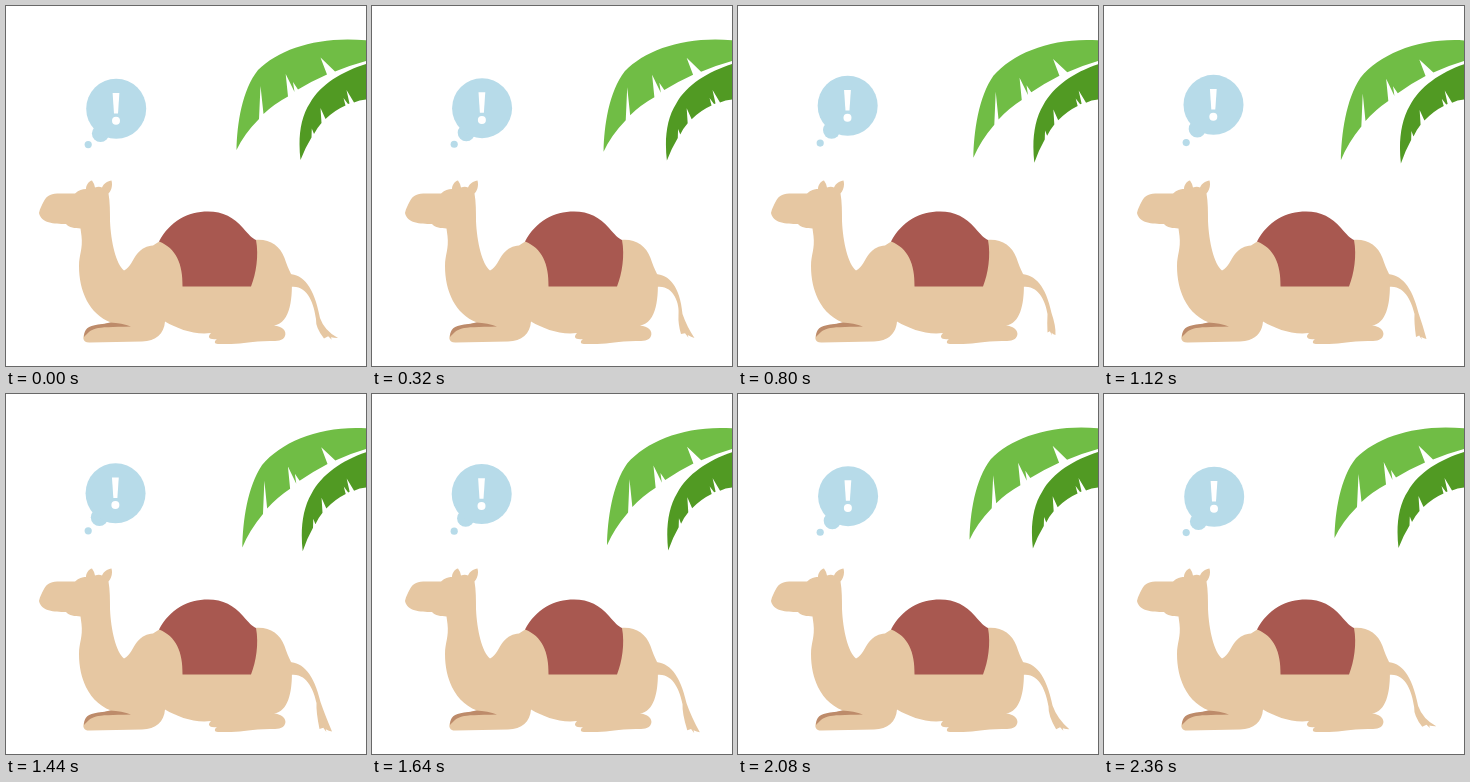
These frames come from a looping animation (360x360 px, 2400 ms). An HTML page:

```html
<!DOCTYPE html>
<html>
<head>
<meta charset="utf-8">
<style>
html, body { margin: 0; width: 100%; height: 100%; overflow: hidden; background: #fff; }
svg { display: block; width: 100vw; height: 100vh; }
</style>
</head>
<body>
<svg viewBox="0 0 360 360">
  <path id="lightLeaf" fill="#70bd45"/>
  <path id="darkLeaf" fill="#519a23"/>
  <g fill="#b7dbe9">
    <circle id="dot" cx="82.2" cy="138.6" r="3.6"/>
    <circle id="puff" cx="94.5" cy="127.5" r="8.6"/>
    <g id="bubble">
      <circle cx="110.2" cy="102.8" r="30"/>
      <path fill="#fff" d="M106.600,87H113.400L112,107.500H108Z"/>
      <circle fill="#fff" cx="110" cy="114.7" r="4"/>
    </g>
  </g>
  <g fill="#e6c7a2">
    <path id="tail"/>
    <path d="M33,207C34,202 36,199 38,195C41,189 46,187.5 54,187.5H69C73,184 76,183 80,183C80,179 83,175 86,174.5
      Q88,177 89,181.5Q93,180 96,181.5C98,177 102,175 105.5,174.5C107,180 105,185 102.5,187.5
      C104,196 104,206 104,215C105,236 110,258 118,264.5C124,262 127,253 131,248C136,242 141,240 147,239.5L154,235
      L200,215L249,234C263,232.5 274,239.5 278.5,252C280.5,258 283,264 285.5,269C287,290 285,317 268,319.5
      C276,320 281,325 279,330C277,335 271,335 264,335C245,335 238,338 225,338H212
      C208,338 208,335 211,333C203,334 201,331 205,327C188,329 172,323 159,315.5
      C158,328 150,335 136,335.5L84,336.5C76,337 76,330 80,325.5C86,319 96,319 105,316.5
      C83,308 73,285 73,260C73,249 77,243 75.5,230L74.5,222.5C69,222 63,222 60,218C48,218 35,217 33,207Z"/>
  </g>
  <path fill="#bd8b6a" d="M78,331C78,323 82,320 92,318.5Q99,318 104,316.5Q116,317 125,320.5
    C106,321 95,321 90,322.5C84,324 82,327 78,331Z"/>
  <path fill="#a85850" d="M153,235.5C164,215 182,205.5 202,205.5C217,205.5 228,211.500 237,222C243,229 246,232 250,234
    C253,250 250,268 245,280.5H176.5C177,258 170,242 153,235.5Z"/>
</svg>
<script>
const LOOP = 2400;
const el = id => document.getElementById(id);

const lightLeaf = `M230.5,144C231,118 236,84 252,64C274,42 315,29.5 362,34.5L362,54.5Q345,59 329,65.5L314.5,51.5L321,68.5
  Q306,75 292,83.5L287,76L288.5,86L279.7,68L282,90.5Q268,98 257.5,108L254.5,80L253,113Q238,128 230.5,144Z`;
const darkLeaf = `M294.5,154C292,133 294,112 304,97C315,78 337,65 362,57.5L362,93.5Q354,93.5 348,96.5L340.5,84
  L343.5,97.5L342,98L337.5,92L339.5,99.5Q329,104 319.5,113L314.5,102L315.5,117Q311,122 308,128L305.8,122.5L305.5,131.5Q299,142 294.5,154Z`;

// Bends a leaf downwards, more so the farther a point is from its stem
function bend(path, amount, dx) {
  return path.replace(/([\d.]+),([\d.]+)/g, (_, x, y) => {
    const d = Math.max(0, 360 - x) / 130;
    return `${+x + amount * dx * d ** 2},${+y + amount * 10.5 * d ** 1.6}`;
  });
}

// Tail poses: time, then x and y of the neck, right tip and left tip of the tuft
const poses = [
  [0, 312.5, 313, 332, 332, 318, 332.5],
  [320, 309, 309, 322.5, 332, 309, 328],
  [800, 312, 308, 317.5, 329, 309.5, 326.5],
  [1120, 313, 308, 322.5, 333, 312, 331],
  [1440, 313, 309, 326, 337.5, 313.5, 335],
  [1800, 313, 311, 329, 338, 316.5, 336.5]
];

function poseAt(i) {
  const n = poses.length, [time, ...values] = poses[(i + n) % n];
  return { time: time + Math.floor(i / n) * LOOP, values };
}

// Smooth cyclic interpolation between the poses
function tailValues(t) {
  const i = poses.findLastIndex(p => p[0] <= t);
  const [a, b, c, d] = [i - 1, i, i + 1, i + 2].map(poseAt);
  const span = c.time - b.time, u = (t - b.time) / span;
  return b.values.map((p, k) => {
    const q = c.values[k];
    const m = (q - a.values[k]) / (c.time - a.time) * span;
    const n = (d.values[k] - p) / (d.time - b.time) * span;
    return p + u * (m + u * (3 * (q - p) - 2 * m - n + u * (2 * (p - q) + m + n)));
  });
}

function tailPath(t) {
  const [nx, ny, rx, ry, lx, ly] = tailValues(t);
  const tuft = (f, dy) => `${lx + (rx - lx) * f},${ly + (ry - ly) * f + dy}`;
  return `M283,268C297,268.5 308,280 ${nx + 1.5},${ny - 1}
    Q${nx + 6},${ny + 12} ${rx},${ry}Q${tuft(.75, 0)} ${tuft(.5, -1)}
    L${tuft(.55, 1.5)}L${tuft(.3, -2)}L${lx},${ly}
    Q${nx - 3},${ny + 9} ${nx - 2.5},${ny}C308,297 301,278 284,281Z`;
}

function move(id, x, y) {
  el(id).setAttribute("transform", `translate(${x} ${y})`);
}

function draw() {
  const t = performance.now() % LOOP;
  const sway = (1 - Math.cos(t / LOOP * 2 * Math.PI)) / 2;
  el("lightLeaf").setAttribute("d", bend(lightLeaf, sway, 6.5));
  el("darkLeaf").setAttribute("d", bend(darkLeaf, sway, 9.5));
  el("tail").setAttribute("d", tailPath(t));
  move("bubble", -.7 * sway, -4 * sway);
  move("puff", -1.2 * sway, -4.6 * sway);
  move("dot", 0, -2 * sway);
  requestAnimationFrame(draw);
}
draw();
</script>
</body>
</html>
```
